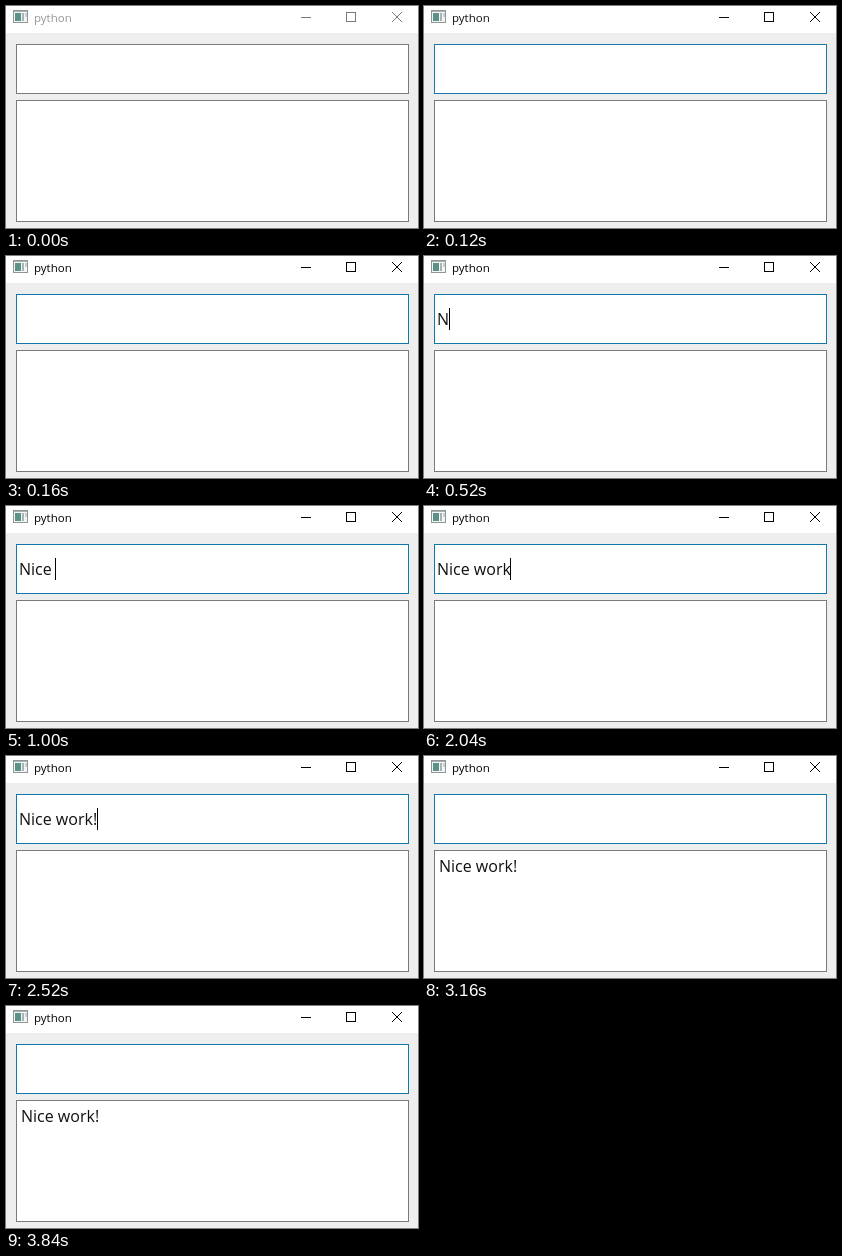
These frames come from a looping animation (412 by 222 pixels, 3920 ms). An HTML page with a canvas:

```html
<!DOCTYPE html>
<html lang="en">
<head>
<meta charset="utf-8">
<title>python</title>
<style>
html, body { margin: 0; width: 100%; height: 100%; overflow: hidden; background: #eee; }
canvas { display: block; }
</style>
</head>
<body>
<canvas id="stage" width="412" height="222"></canvas>
<script>
const ctx = document.getElementById('stage').getContext('2d');
const LOOP = 3920;
const FONT = '"Open Sans", "Noto Sans", sans-serif';
const TEXT = 'Nice work!';

// [time in ms, number of characters typed]
const TYPING = [[520, 1], [560, 3], [600, 5], [1280, 6], [1400, 7], [1520, 8], [1920, 9], [2440, 10]];
const SUBMIT = 3160;

function fill(color, x, y, w, h) {
  ctx.fillStyle = color;
  ctx.fillRect(x, y, w, h);
}

function box(border, x, y, w, h, inside = '#fff') {
  fill(border, x, y, w, h);
  fill(inside, x + 1, y + 1, w - 2, h - 2);
}

function label(text, x, y, size, color) {
  ctx.font = `${size}px ${FONT}`;
  ctx.fillStyle = color;
  ctx.fillText(text, x, y);
}

function mix(a, b, k) {
  return `rgb(${a.map((v, i) => Math.round(v + (b[i] - v) * k))})`;
}

function icon() {
  box('#8f9696', 7, 4, 15, 13, '#f4f6f6');
  fill('#a9b0b0', 8, 5, 13, 1);
  fill('#5b9187', 9, 7, 6, 8);
  fill('#a8b5b8', 16, 7, 2, 8);
  fill('#c9cfd0', 19, 7, 2, 4);
}

function titleBar(active) {
  fill('#fff', 0, 0, 412, 27);
  icon();
  label('python', 28, 16, 11.5, mix([150, 150, 150], [0, 0, 0], active));

  const ink = mix([122, 122, 122], [0, 0, 0], active);
  fill(ink, 295, 11, 10, 1);
  box(ink, 340, 6, 10, 10);
  ctx.strokeStyle = ink;
  ctx.lineWidth = 1;
  ctx.beginPath();
  ctx.moveTo(386, 6);
  ctx.lineTo(396, 16);
  ctx.moveTo(396, 6);
  ctx.lineTo(386, 16);
  ctx.stroke();
}

function draw(t) {
  const active = t < 80 ? 0 : t < 120 ? 0.6 : t < 160 ? 0.9 : 1;
  const sent = t >= SUBMIT;
  const count = sent ? 0 : TYPING.reduce((n, [at, c]) => t >= at ? c : n, 0);

  fill('#eee', 0, 0, 412, 222);
  titleBar(active);
  box(mix([122, 122, 122], [18, 119, 171], active), 10, 38, 393, 50);
  box('#7a7a7a', 10, 94, 393, 122);

  if (count) {
    const typed = TEXT.slice(0, count);
    label(typed, 13, 69, 16, '#111');
    fill('#000', Math.floor(13 + ctx.measureText(typed).width), 52, 1, 22);
  }
  if (sent) label(TEXT, 15, 116, 16, '#111');
}

const start = performance.now();
function tick() {
  draw((performance.now() - start) % LOOP);
  requestAnimationFrame(tick);
}
tick();
</script>
</body>
</html>
```
